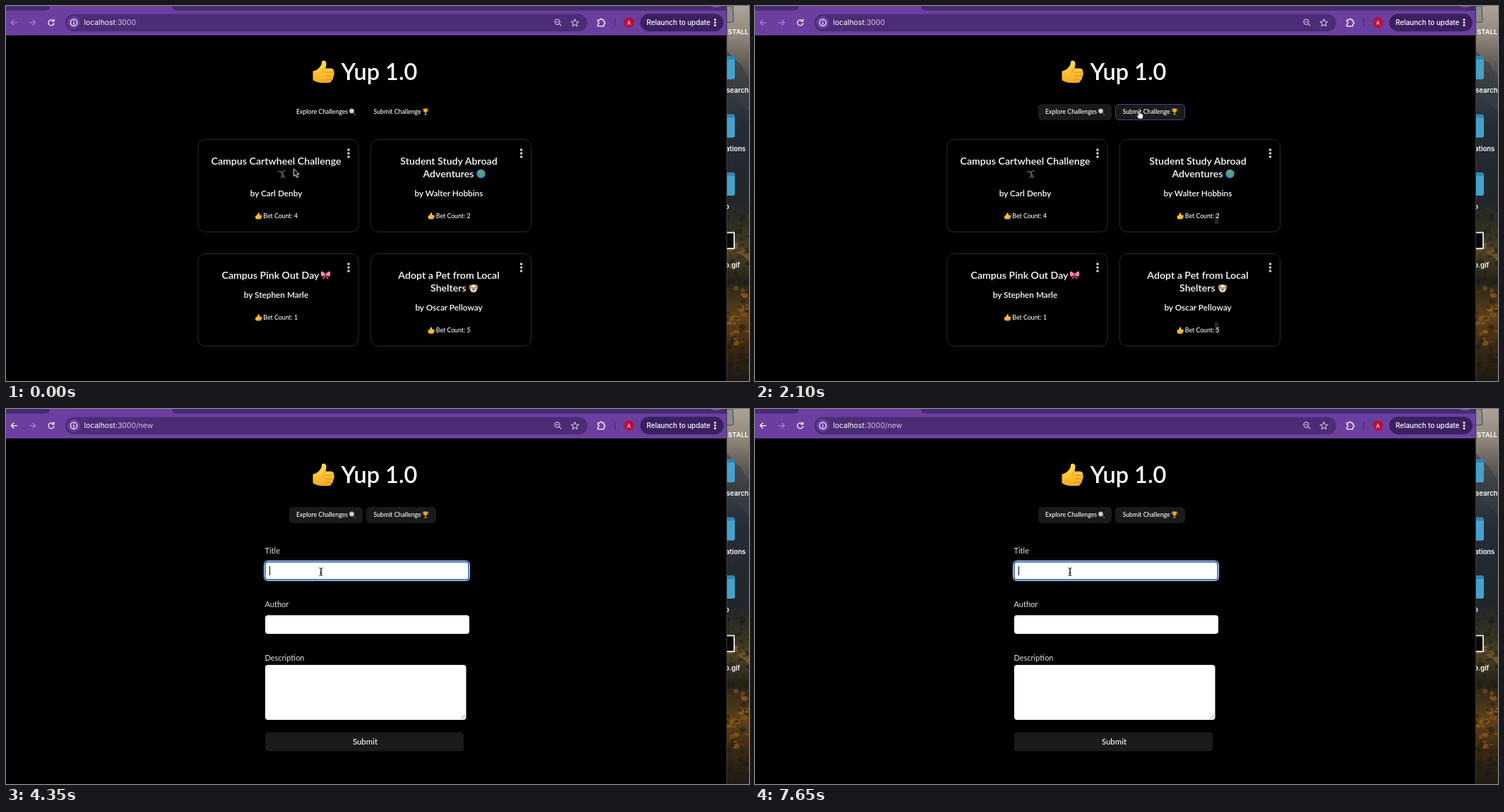
An HTML page that plays this animation: 1052 px wide and 532 px high, repeating every 8000 ms.

```html
<!DOCTYPE html>
<html lang="en">
<head>
<meta charset="utf-8">
<title>Challenge board</title>
<style>
  html, body { margin: 0; width: 100%; height: 100%; overflow: hidden; background: #000; }
  svg { display: block; width: 1052px; height: 532px; }
  text { font-family: Lato, "Open Sans", sans-serif; fill: #fff; }
  .ui { font-family: Inter, Roboto, sans-serif; }
  .mid { text-anchor: middle; }
  .title { font-size: 14.2px; font-weight: 600; }
  .by { font-size: 11.8px; font-weight: 600; }
  .small { font-size: 8.75px; font-weight: 500; }
  .label { font-size: 11px; fill: #e4e4e4; }
  .typed { font: 11.3px "Liberation Sans", Arial, sans-serif; fill: #000; }
  .desk { font: 600 9.6px Inter, sans-serif; }
  .line { fill: none; stroke: #fff; stroke-width: 1.25; stroke-linecap: round; stroke-linejoin: round; }
</style>
</head>
<body>
<svg viewBox="0 0 1052 532" xmlns="http://www.w3.org/2000/svg">
  <defs>
    <linearGradient id="skin" x2="0" y2="1">
      <stop offset="0" stop-color="#ffdf55"/><stop offset="1" stop-color="#f8a91d"/>
    </linearGradient>
    <linearGradient id="hills" x2="0" y2="1">
      <stop offset="0" stop-color="#aca297"/><stop offset=".08" stop-color="#90877c"/>
      <stop offset=".15" stop-color="#625d56"/><stop offset=".21" stop-color="#3a3e44"/>
      <stop offset=".32" stop-color="#262c35"/><stop offset=".52" stop-color="#22262a"/>
      <stop offset=".59" stop-color="#302f22"/><stop offset=".66" stop-color="#4b4023"/>
      <stop offset=".73" stop-color="#232219"/><stop offset=".83" stop-color="#5f4119"/>
      <stop offset=".91" stop-color="#3b2813"/><stop offset="1" stop-color="#1e1a16"/>
    </linearGradient>
    <clipPath id="side"><rect x="1020" width="32" height="532"/></clipPath>

    <symbol id="thumb" viewBox="0 0 32 33" overflow="visible">
      <path fill="url(#skin)" d="M.5 15.500Q6 14.500 9.500 10.500Q13.500 6 13 2.500Q13.500 0 16 .5Q20 1 19.500 6Q19 9 18.500 11.500H26Q30 11.500 30 15Q31.500 17 30.500 19.500Q31.200 22.500 29 24.500Q29.500 27.500 27 28.500Q26.500 32 22 32H14Q6 32 .5 28Z"/>
      <path fill="none" stroke="#d98412" stroke-width=".9" stroke-linecap="round" d="M18.500 17H29M18.500 22H29M19 27H27M18.500 11.500Q14.500 14.500 14.500 17.500"/>
    </symbol>
    <symbol id="lens" viewBox="0 0 10 10" overflow="visible">
      <path d="M6 6L9.300 9.300" stroke="#4a4a4e" stroke-width="1.700" stroke-linecap="round"/>
      <circle cx="4" cy="4" r="3.300" fill="#cfd6d8" stroke="#85898c" stroke-width=".9"/>
    </symbol>
    <symbol id="cup" viewBox="0 0 10 10" overflow="visible">
      <path d="M2.500 1.500H.8Q.8 5 3.500 5.200M7.500 1.500H9.200Q9.200 5 6.500 5.200" fill="none" stroke="#c98c1d" stroke-width=".8"/>
      <path d="M2.300.4H7.700Q7.800 5 5.600 6V8H4.400V6Q2.200 5 2.300.4Z" fill="#eeb233"/>
      <path d="M2.800 8H7.200V9.900H2.800Z" fill="#8a5a2b"/>
    </symbol>
    <symbol id="wheel" viewBox="0 0 13 13" overflow="visible">
      <path d="M.8 2.600L5.600 3.500L11 1.400" fill="none" stroke="#68635a" stroke-width="1.300" stroke-linecap="round"/>
      <path d="M5.500 3.500L7.400 7.500" stroke="#425a78" stroke-width="2.400" stroke-linecap="round"/>
      <path d="M7 7.500L4.800 12M8 7.500L9.800 12" stroke="#94693b" stroke-width="1.100" stroke-linecap="round"/>
      <circle cx="7.500" cy="10" r="1.200" fill="#543a26"/>
    </symbol>
    <symbol id="globe" viewBox="0 0 13 13" overflow="visible">
      <circle cx="6.500" cy="6.500" r="6.200" fill="#3d8fd6"/>
      <path d="M3 2Q6 0 8 2.500L10.500 4.500L8.500 6.500L7.500 11L5.800 9L5.500 6.500L2.300 5.500Z" fill="#65a84a"/>
      <path d="M10 8L12 7L11 10Z" fill="#65a84a"/>
    </symbol>
    <symbol id="bow" viewBox="0 0 14 13" overflow="visible">
      <path d="M6 6L2.500 12L5 11.500L7 7L9 11.500L11.500 12L8 6Z" fill="#d94f88"/>
      <path d="M7 5Q2-.5.5 1.500Q-.3 5 1 8Q3 9 7 5.500Q11 9 13 8Q14.300 5 13.500 1.500Q12-.5 7 5Z" fill="#f48ab5"/>
      <rect x="5.500" y="3.500" width="3" height="3.600" rx="1" fill="#c9386f"/>
    </symbol>
    <symbol id="dog" viewBox="0 0 13 13" overflow="visible">
      <ellipse cx="6.500" cy="6.800" rx="5" ry="5.700" fill="#f2e7d6"/>
      <path d="M3.500 1.200Q.2.500.2 6Q.8 9 2.500 7.500ZM9.500 1.200Q12.800.5 12.800 6Q12.200 9 10.500 7.500Z" fill="#bd7d3c"/>
      <circle cx="4.500" cy="5.800" r=".9" fill="#33251d"/><circle cx="8.500" cy="5.800" r=".9" fill="#33251d"/>
      <ellipse cx="6.500" cy="8" rx="1.500" ry="1" fill="#33251d"/>
      <path d="M5.600 9.800H7.400V11.300Q6.500 12.300 5.600 11.300Z" fill="#e8667a"/>
    </symbol>
    <g id="dots"><circle cy="-5" r="1.800"/><circle r="1.800"/><circle cy="5" r="1.800"/></g>
    <g id="folder">
      <path d="M1020 1H1029Q1032 1 1032 4V31Q1032 34 1029 34H1020Z" fill="#2f86b3"/>
      <path d="M1020 6H1032V31Q1032 34 1029 34H1020Z" fill="#45a2cc"/>
    </g>
  </defs>

  <!-- desktop strip -->
  <g clip-path="url(#side)">
    <rect x="1020" width="32" height="532" fill="url(#hills)"/>
    <path d="M1020 62L1030 74L1040 82L1052 104V150L1020 120Z" fill="#3a3e43" opacity=".6"/>
    <path d="M1020 330Q1040 335 1052 352V362Q1036 345 1020 348Z" fill="#7a6032" opacity=".7"/>
    <g id="leaves"></g>
    <path d="M1020 0H1029L1030 21Q1030 23 1027 23H1020Z" fill="#8b8d8e" stroke="#444"/>
    <use href="#folder" y="70"/><use href="#folder" y="152.500"/><use href="#folder" y="235"/>
    <rect x="1010" y="321.500" width="21" height="22.500" fill="#08080a" stroke="#eee" stroke-width="1.800"/>
    <text class="desk" x="1022" y="40">STALL</text>
    <text class="desk" x="1020" y="122.500">search</text>
    <text class="desk" x="1019" y="205.500">ations</text>
    <text class="desk" x="1018" y="288">o</text>
    <text class="desk" x="1018" y="370.500">o.gif</text>
  </g>

  <!-- browser window -->
  <rect width="1020" height="532"/>
  <rect width="1020" height="41" fill="#6b3fa0"/>
  <path d="M0 0H62Q62 6.500 55 6.500H0ZM235 0H1020V6.500H242Q235 6.500 235 0Z" fill="#482a70"/>
  <path d="M997 0Q1005 4 1014 0Z" fill="#7a50ad"/>
  <path d="M0 41H1020" stroke="#8157b3"/>
  <path d="M1020.500 0V532" stroke="#3d3d40"/>
  <rect x="84" y="11.500" width="739" height="24.500" rx="12.250" fill="#4b2c76"/>
  <circle cx="96" cy="23.500" r="9" fill="#6b3fa0"/>
  <g class="line">
    <path id="back" d="M15.500 23.500H7.500M11 19.800L7.300 23.500L11 27.200"/>
    <path d="M33.500 23.500H41.500M38 19.800L41.700 23.500L38 27.200" stroke="#a184c4"/>
    <path d="M67.300 21.200A4 4 0 1 0 68 24.500M68 18.800V21.700H65"/>
    <circle cx="96" cy="23.500" r="4.600"/><path d="M96 23.300V25.800M96 21.200V21.300"/>
    <g stroke="#d3c3e6" stroke-width="1.100">
      <path d="M783.200 25.200L786 28M778.800 22.500H782.200"/><circle cx="780.500" cy="22.500" r="3.600"/>
      <path d="M805.500 18.500L807 22L810.800 22.300L807.900 24.800L808.800 28.500L805.500 26.500L802.200 28.500L803.100 24.800L800.200 22.300L804 22Z"/>
    </g>
    <path d="M838 19.800H840.800A1.700 1.700 0 0 1 844.200 19.800H846.500V22.300A1.700 1.700 0 0 1 846.500 25.700V28.500H838V25.700A1.700 1.700 0 0 0 838 22.300Z"/>
    <path d="M862 18.500V28.500" stroke="#4b2c76"/>
  </g>
  <text class="ui" x="110.500" y="27.300" font-size="10.400">localhost<tspan fill="#d3c3e6">:3000<tspan id="path"></tspan></tspan></text>
  <circle cx="882" cy="23.500" r="7.500" fill="#b8103f"/>
  <text class="ui mid" x="882" y="26.500" font-size="8">A</text>
  <rect x="898" y="11" width="118" height="25" rx="12.500" fill="#3a2060"/>
  <text class="ui" x="907" y="27.200" font-size="9.800" font-weight="500">Relaunch to update</text>
  <g fill="#fff" transform="translate(1004 23.500) scale(.8)"><use href="#dots"/></g>

  <!-- page header -->
  <use href="#thumb" x="434" y="77" width="32" height="33"/>
  <text x="474.500" y="105" font-size="32.500" font-weight="600">Yup 1.0</text>
  <rect id="exploreBtn" x="401.500" y="139.500" width="103" height="22" rx="4.500"/>
  <rect id="submitBtn" x="510.500" y="139.500" width="98" height="22" rx="4.500"/>
  <text class="small" x="411" y="153.300">Explore Challenges</text>
  <use href="#lens" x="485.500" y="145" width="10" height="10"/>
  <text class="small" x="520.500" y="153.300">Submit Challenge</text>
  <use href="#cup" x="589" y="145" width="10" height="10"/>

  <g id="board">
    <g id="marks" fill="#262626"><rect x="651" y="295" width="5" height="14"/><rect x="651" y="449" width="5" height="15"/></g>
  </g>

  <g id="form">
    <text class="label" x="366.500" y="205.300">Title</text>
    <text class="label" x="366.500" y="281.200">Author</text>
    <text class="label" x="366.500" y="357.200">Description</text>
    <rect x="367" y="217" width="289" height="26" rx="4" fill="#fff"/>
    <rect x="367" y="292.500" width="289" height="26.500" rx="4" fill="#fff"/>
    <rect x="367" y="363" width="284.500" height="78" rx="4" fill="#fff"/>
    <path d="M644.500 439.500L650 434M648 439.500L650 437.500" stroke="#777" stroke-width=".8"/>
    <rect x="367" y="458.500" width="281" height="27" rx="4" fill="#1a1a1a"/>
    <text class="mid" x="508.500" y="475.700" font-size="11.400" font-weight="500">Submit</text>
    <g id="ring" fill="none">
      <rect x="365.500" y="215.500" width="291" height="28" rx="5" stroke="#dce8fa"/>
      <rect x="366.800" y="216.800" width="288.400" height="25.400" rx="4" stroke="#2468cf" stroke-width="1.700"/>
    </g>
    <rect id="picked" x="372.500" y="223" width="13" height="13" fill="#b4d7fe"/>
    <text id="typed" class="typed" x="372" y="233.700"></text>
    <rect id="caret" width="1" height="13"/>
  </g>

  <g id="pointer">
    <path id="arrow" d="M0 0V10.500L2.400 8.300L4 12.300L6 11.500L4.400 7.600H7.500Z" fill="#000" stroke="#fff" stroke-width=".9"/>
    <path id="hand" d="M-1 .8Q0-.6 1 .8V4.300Q2 3.500 2.800 4.500Q4 4 4.500 5Q6 4.700 6 6.200V8.500Q6 10 5 11.800H-.5Q-1.500 9.700-3 7.800Q-3.300 6-1 7.200Z" fill="#fff" stroke="#111" stroke-width=".7"/>
    <path id="beam" d="M-2.500-5.500Q0-5.500 0-4V4Q0 5.500-2.500 5.500M2.500-5.500Q0-5.500 0-4V4Q0 5.500 2.500 5.500M-1.500 1.500H1.500" fill="none" stroke="#111"/>
  </g>
</svg>

<script>
const LOOP = 8000;
const $ = id => document.getElementById(id);
const show = (id, on) => $(id).setAttribute("visibility", on ? "inherit" : "hidden");

function add(parent, tag, attrs, text) {
  const node = document.createElementNS("http://www.w3.org/2000/svg", tag);
  for (const key in attrs) node.setAttribute(key, attrs[key]);
  if (text) node.textContent = text;
  parent.append(node);
  return node;
}

// Lines hold [text, x, y]; a null x means centred in the card.
const cards = [
  { x: 272, y: 189, lines: [["Campus Cartwheel Challenge", null, 225]],
    icon: ["wheel", 384.5, 232, 13], by: "Carl Denby", byY: 270.3, count: 4, countY: 301 },
  { x: 516.5, y: 189, lines: [["Student Study Abroad", null, 225], ["Adventures", 590.5, 243]],
    icon: ["globe", 666, 231.5, 13], by: "Walter Hobbins", byY: 270.3, count: 2, countY: 301 },
  { x: 272, y: 351, lines: [["Campus Pink Out Day", 305.5, 387.3]],
    icon: ["bow", 445.5, 375.5, 14], by: "Stephen Marle", byY: 414.3, count: 1, countY: 445 },
  { x: 516.5, y: 351, lines: [["Adopt a Pet from Local", null, 387.3], ["Shelters", 601, 405.3]],
    icon: ["dog", 655.5, 394, 13], by: "Oscar Pelloway", byY: 432.3, count: 5, countY: 463.3 }
];

function drawCard(c) {
  const g = add($("board"), "g", {});
  const mid = c.x + 110.5;
  add(g, "rect", { x: c.x, y: c.y + .5, width: 227, height: 131, rx: 10, fill: "none", stroke: "#2a2a2a" });
  add(g, "use", { href: "#dots", transform: `translate(${c.x + 213} ${c.y + 20})`, fill: "#d2d2d2" });
  for (const [text, x, y] of c.lines)
    add(g, "text", { class: x ? "title" : "title mid", x: x || mid, y }, text);
  const [name, x, y, size] = c.icon;
  add(g, "use", { href: "#" + name, x, y, width: size, height: 13 });
  add(g, "text", { class: "by mid", x: mid, y: c.byY }, "by " + c.by);
  add(g, "use", { href: "#thumb", x: c.x + 81, y: c.countY - 8, width: 9.5, height: 10 });
  add(g, "text", { class: "small", x: c.x + 92.3, y: c.countY }, "Bet Count: " + c.count);
}
cards.forEach(drawCard);

let seed = 7;
const rand = () => (seed = seed * 16807 % 2147483647) / 2147483647;
for (let i = 0; i < 110; i++) {
  const y = 290 + rand() * 242;
  const warm = y > 395 && y < 480 && rand() > .45;
  add($("leaves"), "ellipse", {
    cx: 1020 + rand() * 32, cy: y, rx: 1 + rand() * 4, ry: 1 + rand() * 3,
    fill: warm ? "#a8681f" : "#1d1c13", opacity: .25 + rand() * .35
  });
}

// Step tables: [start ms, value...], each held until the next row.
const moves = [
  [0, 407.5, 231, "arrow"], [150, 411, 227, "arrow"], [300, 423, 212, "arrow"],
  [450, 441, 190, "arrow"], [600, 458, 168, "arrow"], [750, 468, 156, "hand"],
  [900, 473.5, 152.3, "hand"], [1800, 485, 152, "hand"], [1950, 518, 150, "hand"],
  [2100, 543.5, 148.3, "hand"], [3000, 530, 158, "hand"], [3150, 497, 188, "arrow"],
  [3300, 458, 224, "beam"], [3450, 446, 231, "beam"]
];
const hovers = [[0, ""], [750, "explore"], [1950, "submit"], [3150, ""]];
const markLevels = [[0, 0], [1200, .5], [1350, 1]];
const typing = [[0, ""], [4650, "M"], [4800, "Mr"], [6600, ""]];
const focus = [[0, ""], [3450, "title"], [5400, "author"], [6150, "title"]];
const carets = [
  [0, 0], [3450, 373], [3900, 0], [4350, 373], [4650, 381], [4800, 385],
  [5400, 373], [5850, 0], [6600, 373], [7050, 0], [7650, 373]
];
const at = (table, t) => table.findLast(row => row[0] <= t).slice(1);

function paintButton(id, filled, hovered) {
  $(id).setAttribute("fill", filled ? "#1a1a1a" : "none");
  $(id).setAttribute("stroke", hovered ? "#414489" : filled ? "#1a1a1a" : "none");
}

function draw(t) {
  const onForm = t >= 2700;
  show("board", !onForm);
  show("form", onForm);
  $("path").textContent = onForm ? "/new" : "";
  $("back").setAttribute("stroke", onForm ? "#fff" : "#a184c4");

  const [hover] = at(hovers, t);
  paintButton("exploreBtn", t >= 750, hover === "explore");
  paintButton("submitBtn", t >= 1950, hover === "submit");
  $("marks").setAttribute("opacity", at(markLevels, t)[0]);

  const [field] = at(focus, t);
  const drop = field === "author" ? 76 : 0;
  show("ring", onForm && field);
  $("ring").setAttribute("transform", `translate(0 ${drop})`);
  $("typed").textContent = at(typing, t)[0];
  show("picked", t >= 6150 && t < 6600);
  const [caretX] = at(carets, t);
  show("caret", caretX);
  $("caret").setAttribute("x", caretX);
  $("caret").setAttribute("y", 223 + drop);

  const [x, y, shape] = at(moves, t);
  $("pointer").setAttribute("transform", `translate(${x} ${y})`);
  for (const id of ["arrow", "hand", "beam"]) show(id, id === shape);
}

const start = performance.now();
function tick(now) {
  draw(Math.max(0, now - start) % LOOP);
  requestAnimationFrame(tick);
}
draw(0);
requestAnimationFrame(tick);
</script>
</body>
</html>
```
